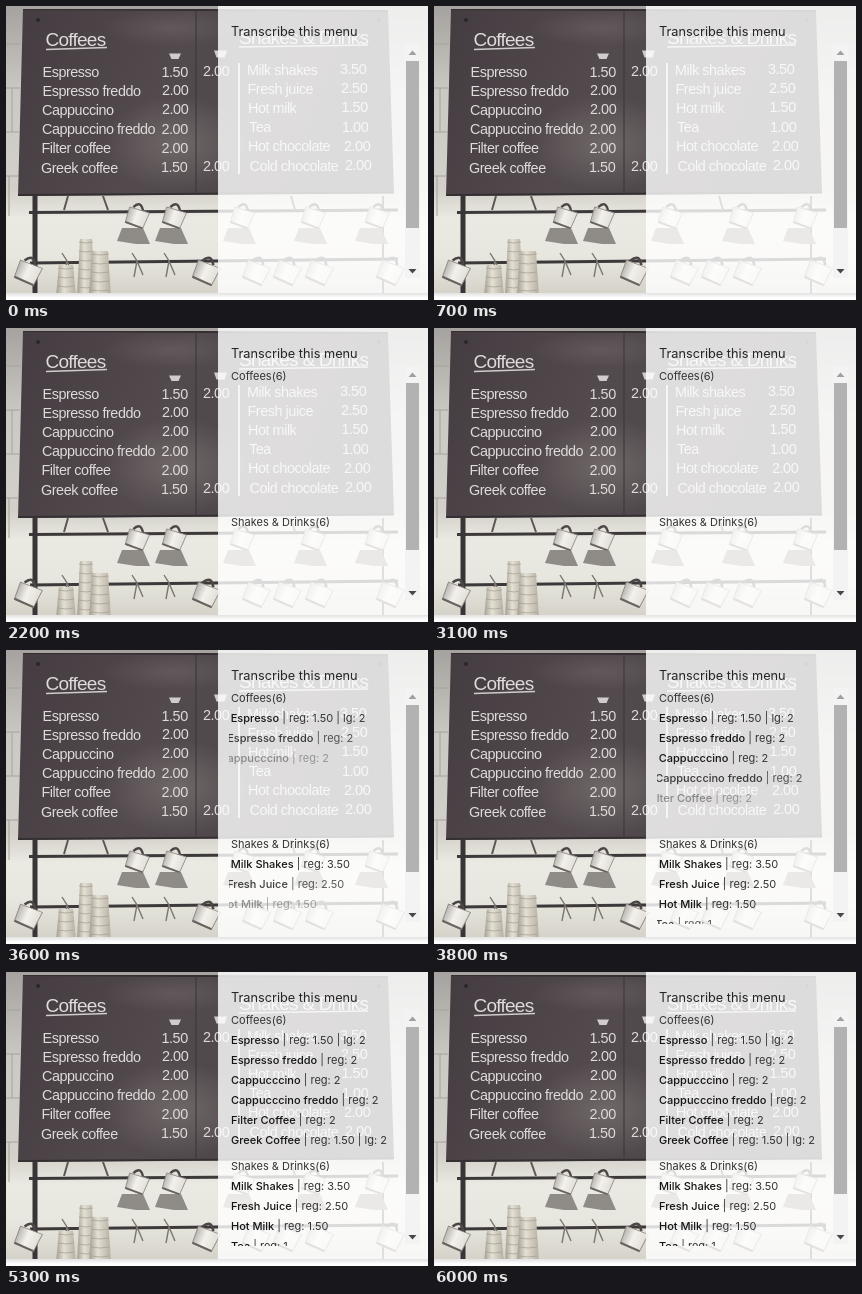
Animation of 422 by 294 pixels, one loop 6.9 s. Source, as an HTML page:

```html
<!DOCTYPE html>
<html lang="en">
<head>
<meta charset="utf-8">
<title>Menu transcription</title>
<style>
html, body { margin: 0; width: 100%; height: 100%; overflow: hidden; background: #fff; }
svg { display: block; width: 422px; height: 294px; }
.board { font-family: "Liberation Sans", Arial, sans-serif; font-size: 14.4px; letter-spacing: -.45px; fill: #dedbda; }
.board .head { font-size: 19px; letter-spacing: -.75px; }
.list { font-family: Inter, sans-serif; font-size: 11px; fill: #333; }
.list .name { font-weight: 500; fill: #141414; }
.title { font-family: Inter, sans-serif; font-size: 12.75px; fill: #262626; }
</style>
</head>
<body>
<svg id="stage" viewBox="0 0 422 294">
  <defs>
    <linearGradient id="wall" x2="0" y2="1">
      <stop offset="0" stop-color="#a5a29f"/>
      <stop offset=".3" stop-color="#cbc9c4"/>
      <stop offset=".64" stop-color="#d2d0c9"/>
      <stop offset=".74" stop-color="#eae9e2"/>
      <stop offset=".87" stop-color="#e8e7df"/>
      <stop offset="1" stop-color="#d5d3c9"/>
    </linearGradient>
    <linearGradient id="slate" x2="1" y2=".2">
      <stop offset="0" stop-color="#453c41"/>
      <stop offset=".45" stop-color="#524a4d"/>
      <stop offset="1" stop-color="#4c4548"/>
    </linearGradient>
    <radialGradient id="chalk">
      <stop offset="0" stop-color="#857d7a" stop-opacity=".6"/>
      <stop offset="1" stop-color="#857d7a" stop-opacity="0"/>
    </radialGradient>
    <linearGradient id="paper">
      <stop offset="0" stop-color="#a39d90"/>
      <stop offset=".4" stop-color="#e4e0d4"/>
      <stop offset="1" stop-color="#b5afa1"/>
    </linearGradient>
    <linearGradient id="glaze">
      <stop offset="0" stop-color="#b9b5b0"/>
      <stop offset=".45" stop-color="#f3f1ec"/>
      <stop offset="1" stop-color="#e2dfd8"/>
    </linearGradient>
    <linearGradient id="shade" x2="0" y2="1">
      <stop offset="0" stop-color="#e2e2e3"/>
      <stop offset="1" stop-color="#fff"/>
    </linearGradient>
    <filter id="soft" x="0" y="0" width="1" height="1"><feGaussianBlur stdDeviation=".5"/></filter>
    <clipPath id="photo"><rect width="422" height="287"/></clipPath>
    <clipPath id="view"><rect x="223" y="38" width="176" height="236"/></clipPath>
  </defs>

  <rect width="422" height="294" fill="#fff"/>
  <rect y="287" width="422" height="5" fill="url(#shade)"/>
  <g clip-path="url(#photo)">
    <rect width="422" height="287" fill="url(#wall)"/>
    <g id="scene" filter="url(#soft)">
      <path d="M0 38H15M0 82H14M0 126H13M0 170H12M6 82V126M3 170V210" stroke="#a5a29d" fill="none"/>
      <path d="M17 3L382 5L388 187L12 190Z" fill="url(#slate)"/>
      <ellipse cx="172" cy="138" rx="75" ry="48" fill="url(#chalk)"/>
      <ellipse cx="165" cy="22" rx="70" ry="18" fill="url(#chalk)" opacity=".5"/>
      <path d="M17 3L382 5M12 189L388 186.5" stroke="#343032" stroke-width="2"/>
      <path d="M190 4V188" stroke="#3a3538"/>
      <circle cx="32" cy="14" r="2" fill="#2b2629"/>
      <circle cx="373" cy="14" r="2" fill="#2b2629"/>
    </g>
    <g id="board" class="board">
      <path d="M40 43.5L101 41.5M233 41L362 39" stroke="#cfcccb" stroke-width="1.4"/>
      <path d="M233 57V168" stroke="#cfcccb" stroke-width="2"/>
      <path d="M163 47.5h12l-2.5 5.5h-7zM208 44.5h13l-2.5 7h-8z" opacity=".9"/>
    </g>
  </g>

  <rect x="212" width="210" height="287" fill="#fff" fill-opacity=".81"/>
  <rect x="399" y="38" width="15" height="234" fill="#f3f3f3"/>
  <rect x="400" y="55" width="13" height="167" fill="#b2b2b2"/>
  <path d="M402.5 49l4-4.5 4 4.5z" fill="#a0a0a0"/>
  <path d="M402.5 263l4 4.5 4-4.5z" fill="#484848"/>
  <text class="title" x="225" y="30">Transcribe this menu</text>
  <g id="list" class="list" clip-path="url(#view)"></g>
</svg>
<script>
const NS = "http://www.w3.org/2000/svg";
const LOOP = 6900, STEP = 100;
const SLIDE = 20, DURATION = 310;
const HEADS_AT = 1740, ITEMS_AT = 3326, STAGGER = 100;
const LIST_X = 225, LINE = 20;
const $ = id => document.getElementById(id);

function add(parent, tag, attrs, text) {
  const el = document.createElementNS(NS, tag);
  for (const key in attrs) el.setAttribute(key, attrs[key]);
  if (text) el.textContent = text;
  parent.appendChild(el);
  return el;
}

const path = (d, fill, stroke = "none", width = 1) =>
  add($("scene"), "path", { d, fill, stroke, "stroke-width": width });

// Rack below the board
path("M23 206.5L392 204M24 257L392 253", "none", "#3d383a", 3);
path("M29 190V287", "none", "#393437", 5);
path("M97 190l5 14M62 190l-4 14M285 190l4 14M377 190V287", "none", "#5c5755", 2);

function mug(x, y, tilt, size = 1.15) {
  const g = add($("scene"), "g", { transform: `translate(${x} ${y}) rotate(${tilt}) scale(${size})` });
  add(g, "path", { d: "M-6 -7q4 -8 9 0", fill: "none", stroke: "#4c4747", "stroke-width": 2 });
  add(g, "path", { d: "M-9 -6L9 -7L8 8L-8 8Z", fill: "url(#glaze)", stroke: "#8f8a86", "stroke-width": .7 });
  add(g, "path", { d: "M-8 7.5H8", stroke: "#69635f", "stroke-width": 1.6 });
}

for (const x of [124, 162, 230, 301, 362])
  path(`M${x - 13} 235l5 -13h21l7 16h-14z`, "#8f8b87");
for (const x of [60, 130, 162]) path(`M${x - 4} 247l5 8l-3 16m3 -16l6 14`, "none", "#7a7570", 1.4);
for (const x of [131, 168, 236, 307, 371]) mug(x, 211, 20);
for (const x of [22, 200, 250, 281, 313, 384]) mug(x, 266, 24, 1.3);

function cupStack(x, top, width) {
  path(`M${x + 3} ${top}h${width - 6}l3 ${290 - top}h${-width}z`, "url(#paper)");
  for (let y = top + 3; y < 288; y += 9)
    path(`M${x + 2} ${y}q${width / 2 - 2} 2 ${width - 4} 0`, "none", "#a39d91", .7);
}
cupStack(50, 259, 20);
cupStack(71, 233, 18);
cupStack(83, 245, 22);

// Chalkboard lettering: [x, baseline, text]
const write = ([x, y, text], cls = "") => add($("board"), "text", { x, y, class: cls }, text);
[[39.5, 39.5, "Coffees"], [233, 38, "Shakes & Drinks"]].forEach(row => write(row, "head"));
[
  [36.5, 71, "Espresso"], [155.5, 71, "1.50"], [197, 70, "2.00"],
  [36.5, 90, "Espresso freddo"], [156, 89, "2.00"],
  [36, 109, "Cappuccino"], [156, 108, "2.00"],
  [36, 128, "Cappuccino freddo"], [155.5, 128, "2.00"],
  [35.5, 147, "Filter coffee"], [155.5, 147, "2.00"],
  [35, 167, "Greek coffee"], [155, 166, "1.50"], [197, 165, "2.00"],
  [241, 69, "Milk shakes"], [334, 68, "3.50"],
  [241.5, 88, "Fresh juice"], [335, 87, "2.50"],
  [242, 107, "Hot milk"], [335.5, 106, "1.50"],
  [243, 126, "Tea"], [336, 126, "1.00"],
  [242, 145, "Hot chocolate"], [338, 145, "2.00"],
  [243.5, 165, "Cold chocolate"], [339, 164, "2.00"]
].forEach(row => write(row));

// Transcribed list
const sections = [
  { y: 52, head: "Coffees(6)", items: [
    ["Espresso", " | reg: 1.50 | lg: 2"], ["Espresso freddo", " | reg: 2"],
    ["Cappucccino", " | reg: 2"], ["Cappucccino freddo", " | reg: 2"],
    ["Filter Coffee", " | reg: 2"], ["Greek Coffee", " | reg: 1.50 | lg: 2"]] },
  { y: 198, head: "Shakes & Drinks(6)", items: [
    ["Milk Shakes", " | reg: 3.50"], ["Fresh Juice", " | reg: 2.50"],
    ["Hot Milk", " | reg: 1.50"], ["Tea", " | reg: 1"]] }
];
const lines = [];
for (const { y, head, items } of sections) {
  lines.push({ el: add($("list"), "text", { x: LIST_X, y }, head), start: HEADS_AT });
  items.forEach(([name, prices], i) => {
    const el = add($("list"), "text", { x: LIST_X, y: y + LINE * (i + 1) });
    add(el, "tspan", { class: "name" }, name);
    add(el, "tspan", {}, prices);
    lines.push({ el, start: ITEMS_AT + STAGGER * i });
  });
}

function render(time) {
  const t = Math.floor((time % LOOP) / STEP) * STEP;
  for (const { el, start } of lines) {
    const p = Math.min(1, Math.max(0, (t - start) / DURATION));
    const rest = (1 - p) ** 2;
    el.setAttribute("transform", `translate(${-SLIDE * rest} 0)`);
    el.setAttribute("opacity", 1 - rest);
  }
}

const begin = performance.now();
function tick() {
  render(performance.now() - begin);
  requestAnimationFrame(tick);
}
tick();
</script>
</body>
</html>
```
